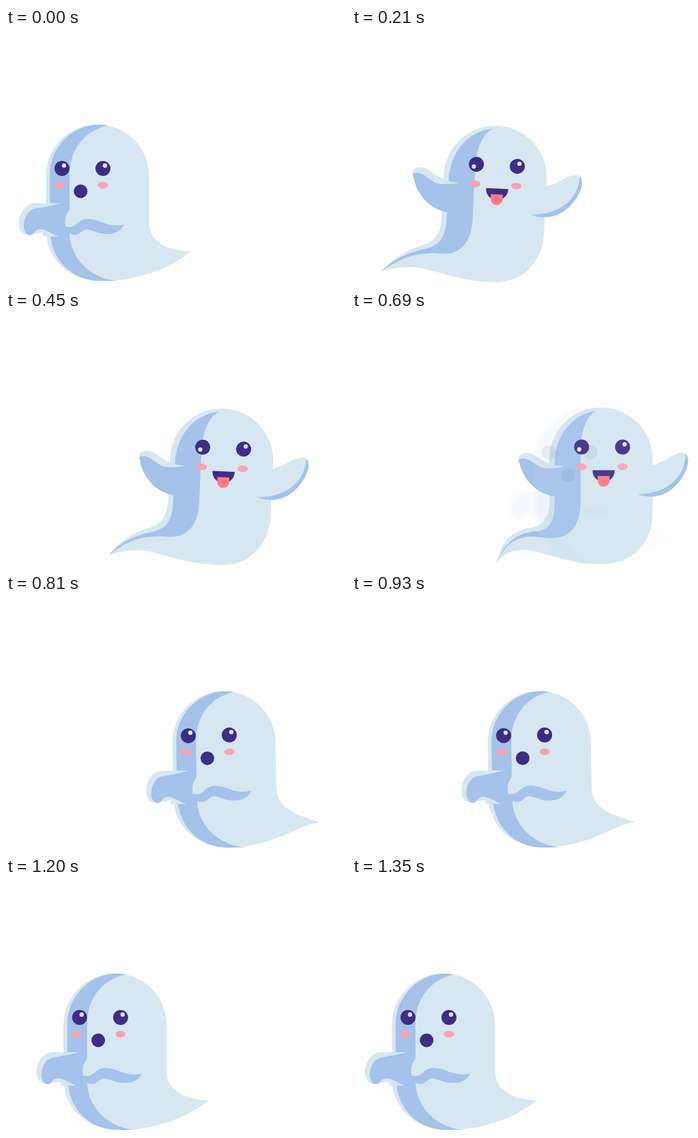
An HTML page with a canvas for the animation above (1.38 s loop, 498 by 374 pixels).

```html
<!DOCTYPE html>
<html>
<head>
<meta charset="utf-8">
<style>
  html, body { margin: 0; width: 100%; height: 100%; overflow: hidden; background: #fff; }
  canvas { display: block; }
</style>
</head>
<body>
<canvas id="stage" width="498" height="374"></canvas>
<script>
const ctx = document.getElementById('stage').getContext('2d');
const LOOP = 1380, TRAVEL = 675;
const LIGHT = '#d7e7f1', SHADE = '#a4c2ea', DARK = '#3c2d85',
      CHEEK = '#fda1b2', TONGUE = '#fd7b80', GLINT = '#dfe5f4';

const clamp = v => Math.min(1, Math.max(0, v));
const smooth = v => { v = clamp(v); return v * v * (3 - 2 * v); };
const mix = (a, b, k) => a + (b - a) * k;

function fill(color, d) {
  ctx.fillStyle = color;
  ctx.fill(new Path2D(d));
}

function oval(color, x, y, rx, ry = rx) {
  ctx.fillStyle = color;
  ctx.beginPath();
  ctx.ellipse(x, y, rx, ry, 0, 0, Math.PI * 2);
  ctx.fill();
}

function eye(x, y, dx, dy) {
  oval(DARK, x, y, 11);
  oval(GLINT, x + dx, y + dy, 3.2);
}

// Places a ghost by its head centre; bend reshapes the tail.
function pose(x, drop, degrees, alpha, draw, bend) {
  ctx.save();
  ctx.globalAlpha = alpha;
  ctx.translate(x, 215 + drop);
  ctx.rotate(degrees * Math.PI / 180);
  ctx.translate(0, -215);
  draw((a, b) => mix(a, b, bend));
  ctx.restore();
}

function happyGhost(m) {
  const tip = `${m(-153, -160)} ${m(370, 362)}`;
  fill(LIGHT, `M75.5 217A75.5 75.5 0 0 0 -75.5 217V282
    C-76 302 -84 ${m(315, 317)} -104 ${m(318, 323)}
    C${m(-132, -125)} ${m(322, 332)} ${m(-147, -142)} ${m(340, 343)} ${tip}
    C-140 ${m(352, 358)} -122 ${m(348, 354)} -100 ${m(352, 356)}
    C-66 ${m(360, 363)} -40 371 3 371C48 371 75.5 338 75.5 296Z`);
  fill(SHADE, `M-6.5 146C-42 151 -68 182 -68 226V282
    C-68 305 -74 ${m(322, 320)} -95 ${m(323, 327)}
    C-125 ${m(325, 336)} -142 ${m(342, 345)} ${tip}
    C-140 ${m(340, 350)} -122 ${m(330, 338)} -100 ${m(331, 335)}
    C-85 332 -83 333 -72 333C-42 333 -30 310 -30 280V205C-30 175 -20 152 -6.5 146Z`);

  fill(LIGHT, 'M-121 222C-124 208 -110 205 -98 211C-86 219 -76 227 -52 228L-70 240Z');
  fill(SHADE, `M-120.5 218C-108 212 -100 224 -86 230C-74 232 -62 230 -52 228
    L-60 272H-66C-92 270 -116 248 -120.5 218Z`);
  fill(LIGHT, 'M70 226H75C92 224 104 208 119 208C128 208 130 218 125 231C114 258 82 276 54 269Z');
  fill(SHADE, 'M124 210C131 216 127 232 119 244C104 268 80 278 54 269C90 268 122 250 124 210Z');

  eye(-28.5, 199.5, -3.5, 3.5);
  eye(31.5, 199.5, 3, -4);
  oval(CHEEK, -28.5, 228.3, 7.6, 4.8);
  oval(CHEEK, 31.5, 228.3, 7.6, 4.8);
  fill(DARK, 'M-12.5 233.5H20C20 243 14 250 3.7 250S-12.5 243 -12.5 233.5Z');
  fill(TONGUE, 'M-5 242H12.5V249A8.75 8.75 0 0 1 -5 249Z');
}

function shyGhost(m) {
  fill(LIGHT, `M-75.5 217A75.5 75.5 0 0 1 75.5 217V285
    C${m(75.5, 78)} 312 ${m(100, 92)} ${m(327, 320)} ${m(137, 138.5)} ${m(327.5, 336.5)}
    C105 ${m(353, 339)} ${m(60, 72)} 371 5 371C-40 371 -75.5 340 -75.5 296Z`);
  fill(SHADE, `M15.5 143C-30 134 -70 172 -70 215V296C-68 340 -38 371 5 371H29
    C-10 368 -41 337 -41 300V215C-41 180 -20 150 15.5 143Z`);

  fill(LIGHT, `M-54 257H-92C-109 258 -115 275 -115 287C-115 300 -106 305 -98 303
    L-80 300V306H-57Z`);
  fill(SHADE, `M-54 257.5C-75 262 -85 264 -92 265C-104 268 -108 282 -108 292
    C-107 300 -103 304 -98 304C-92 303 -93 296 -84 295C-74 296 -66 302 -57 306H-41V257.5Z`);
  fill(LIGHT, 'M-40.5 266C-48 275 -48 283 -47 291L-40 294Z');
  fill(SHADE, `M-47 291C-30 296 -31 280 -14 280C4 280 14 294 39 288C33 304 12 304 0 300
    C-14 295 -18 293 -25 300C-30 305 -38 304 -42 301Z`);

  eye(-52, 206, 3, -4.3);
  eye(8, 206, 3, -4.3);
  oval(CHEEK, -55.5, 230.3, 7.6, 4.8);
  oval(CHEEK, 8, 230.6, 7.6, 4.8);
  oval(DARK, -24.7, 239.5, 10);
}

function render(now) {
  const t = now % LOOP;
  ctx.clearRect(0, 0, 498, 374);

  if (t >= 15 && t < 714) {
    const sway = Math.sin(Math.PI * Math.pow(clamp(t / 690), 0.85));
    const settle = 4.5 * smooth((t - 660) / 30);
    const x = 161.7 + 207.6 * smooth(t / TRAVEL) - settle;
    pose(x, 2 * sway, 3.2 * sway, 1, happyGhost, sway);
  }
  if (t < 15 || t > 689) {
    const u = t < 15 ? 1 : (t - TRAVEL) / TRAVEL;
    const alpha = t < 15 ? 1 : clamp((t - 689) / 25);
    const lean = 1 - smooth((u - 0.3) / 0.4);
    pose(mix(341, 134, smooth(u)), lean, -lean, alpha, shyGhost, lean);
  }
}

const start = performance.now();
(function tick() {
  render(performance.now() - start);
  requestAnimationFrame(tick);
})();
</script>
</body>
</html>
```
